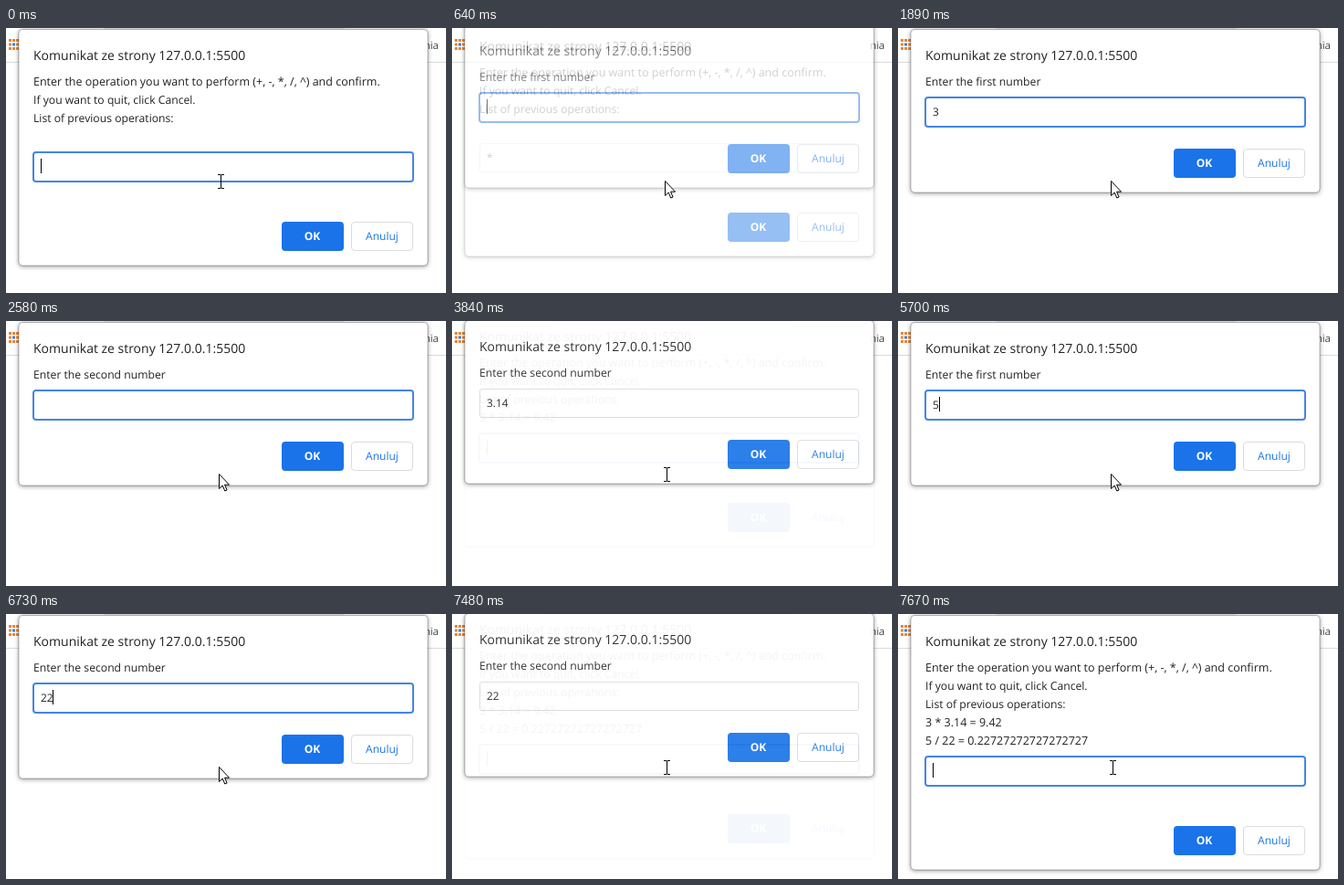
Recreate the animation shown at these times as an HTML page. Size 482 by 290 pixels, loop 8 s.

```html
<!DOCTYPE html>
<html lang="pl">
<head>
<meta charset="utf-8">
<title>Calculator prompts</title>
<style>
html, body { margin: 0; width: 100%; height: 100%; overflow: hidden; background: #fff; }
svg { display: block; width: 482px; height: 290px; }
text { font-family: "Open Sans", "Noto Sans", sans-serif; font-size: 12.2px; fill: #202124; white-space: pre; text-rendering: geometricPrecision; }
.title { font-size: 14px; }
.math { font-size: 12.5px; }
.value { font-size: 11.9px; }
.label { font-size: 12px; text-anchor: middle; }
.ok { font-weight: 700; fill: #fff; }
.cancel { font-weight: 500; fill: #1a73e8; }
.panel { filter: drop-shadow(0 1px 2.5px rgba(0, 0, 0, .4)); }
</style>
</head>
<body>
<svg viewBox="0 0 482 290">
  <rect width="482" height="290" fill="#fff"/>
  <rect x="107" width="264" height="1" fill="#e4e6e8"/>
  <g id="apps"></g>
  <text x="474" y="23" text-anchor="end" style="font-size:11.5px;fill:#45484c">nia</text>
  <rect y="37" width="482" height="1" fill="#d9dbde"/>
  <g id="dialogs"></g>
  <path id="arrow" d="M233.5 167.5v16l3.7-3.5 2.6 6 2.3-1-2.6-5.8h5z" fill="#fff" stroke="#000"/>
  <path id="beam" d="M232 160.5h3l.5 .5 .5-.5h3M235.5 161v14M232 175.5h3l.5-.5 .5 .5h3" fill="none" stroke="#000"/>
</svg>
<script>
const LOOP = 8000;
const RISE = 15;
const $ = id => document.getElementById(id);
const set = (el, attrs) => { for (const k in attrs) el.setAttribute(k, attrs[k]); };
const make = (parent, tag, attrs, text = '') => {
  const el = document.createElementNS('http://www.w3.org/2000/svg', tag);
  set(el, attrs);
  el.textContent = text;
  return parent.appendChild(el);
};

const menu = [
  'Enter the operation you want to perform (+, -, *, /, ^) and confirm.',
  'If you want to quit, click Cancel.',
  'List of previous operations:'
];
const first = ['Enter the first number'];
const second = ['Enter the second number'];
const product = '3 * 3.14 = 9.42';
const quotient = '5 / 22 = 0.22727272727272727';

// Times fully open and starting to close, message, tops of field and buttons
const prompts = [
  { open: 0, close: 500, lines: menu, field: 136, buttons: 212 },
  { open: 710, close: 2070, lines: first, field: 76, buttons: 132 },
  { open: 2260, close: 3840, lines: second, field: 76, buttons: 132 },
  { open: 4030, close: 4910, lines: [...menu, product], field: 136, buttons: 212 },
  { open: 5090, close: 6020, lines: first, field: 76, buttons: 132 },
  { open: 6230, close: 7480, lines: second, field: 76, buttons: 132 },
  { open: 7670, close: LOOP, lines: [...menu, product, quotient], field: 156, buttons: 232 }
];

// Time, field text, caret visible
const typing = [
  [0, '', 1], [180, '*', 1],
  [710, '', 1], [1010, '', 0], [1390, '3', 1], [1890, '3', 0],
  [2260, '', 1], [2580, '', 0], [2650, '3', 1], [3030, '3.', 1], [3150, '3.1', 1], [3330, '3.14', 1],
  [4030, '', 1], [4400, '/', 1],
  [5090, '', 1], [5450, '', 0], [5700, '5', 1],
  [6230, '', 1], [6590, '', 0], [6660, '2', 1], [6730, '22', 1], [7230, '22', 0],
  [7670, '', 1]
];

// Times at which the pointer turns into a text beam and back
const beams = [[0, 500], [3840, 4910], [7480, LOOP]];

for (let i = 0; i < 9; i++) {
  make($('apps'), 'rect', {
    x: 3 + i % 3 * 4, y: 12 + Math.floor(i / 3) * 4.5, width: 3, height: 3,
    fill: i === 4 ? '#4a7fc4' : '#e5873c'
  });
}

function build({ lines, field, buttons }) {
  const root = make($('dialogs'), 'g', {});
  make(root, 'rect', {
    class: 'panel', x: 14, y: 1.5, width: 448, height: buttons + 46.5, rx: 4,
    fill: '#fff', stroke: '#000', 'stroke-opacity': .28
  });
  make(root, 'text', { class: 'title', x: 30, y: 34.8 }, 'Komunikat ze strony 127.0.0.1:5500');
  lines.forEach((line, i) => {
    make(root, 'text', { class: /[+=]/.test(line) ? 'math' : 'prose', x: 30, y: 63 + 20 * i }, line);
  });
  const box = make(root, 'rect', { fill: '#fff' });
  const value = make(root, 'text', { class: 'value', x: 38, y: field + 20 });
  const caret = make(root, 'rect', { y: field + 7, width: 1, height: 16, fill: '#000' });
  make(root, 'rect', { x: 302, y: buttons, width: 68, height: 32, rx: 4, fill: '#1a73e8' });
  make(root, 'text', { class: 'label ok', x: 335.5, y: buttons + 20 }, 'OK');
  make(root, 'rect', { x: 378.5, y: buttons + .5, width: 67, height: 31, rx: 3.5, fill: '#fff', stroke: '#dadce0' });
  make(root, 'text', { class: 'label cancel', x: 412, y: buttons + 20 }, 'Anuluj');
  return { root, box, value, caret, field };
}

const dialogs = prompts.map(build);

function show({ root, box, value, caret, field }, shift, alpha, focus, text, caretOn) {
  set(root, { transform: `translate(0 ${shift})`, opacity: alpha, display: 'inline' });
  set(box, focus
    ? { x: 30, y: field, width: 416, height: 32, rx: 3, stroke: '#4285e8', 'stroke-width': 2 }
    : { x: 30.5, y: field + .5, width: 415, height: 31, rx: 2.5, stroke: '#dadce0', 'stroke-width': 1 });
  value.textContent = text;
  const width = text ? value.getComputedTextLength() : 0;
  set(caret, { x: Math.floor(38.23 + width), opacity: caretOn ? 1 : 0 });
}

// Cross-fade progress, held for three steps
function progress(t, from, to, tall) {
  const step = Math.floor(3 * (t - from) / (to - from));
  return tall ? step / 3 : .12 + .3 * step;
}

function draw(t) {
  const i = prompts.findLastIndex(p => t >= p.open);
  const { close, field } = prompts[i];
  const [, text, caretOn] = typing.findLast(k => t >= k[0]);
  for (const d of dialogs) set(d.root, { display: 'none' });
  if (t < close) {
    show(dialogs[i], 0, 1, true, text, caretOn);
  } else {
    const p = progress(t, close, prompts[i + 1].open, field > 100);
    const fade = p ** 1.5;
    show(dialogs[i], Math.round(-RISE * p), 1 - fade, p === 0, text, false);
    show(dialogs[i + 1], Math.round(-RISE * (1 - p)), fade, true, '', true);
  }
  const beam = beams.some(([a, b]) => t >= a && t < b);
  set($('beam'), { opacity: beam ? 1 : 0 });
  set($('arrow'), { opacity: beam ? 0 : 1 });
}

const start = performance.now();
function tick(now) {
  draw(Math.max(0, now - start) % LOOP);
  requestAnimationFrame(tick);
}
draw(0);
requestAnimationFrame(tick);
</script>
</body>
</html>
```
